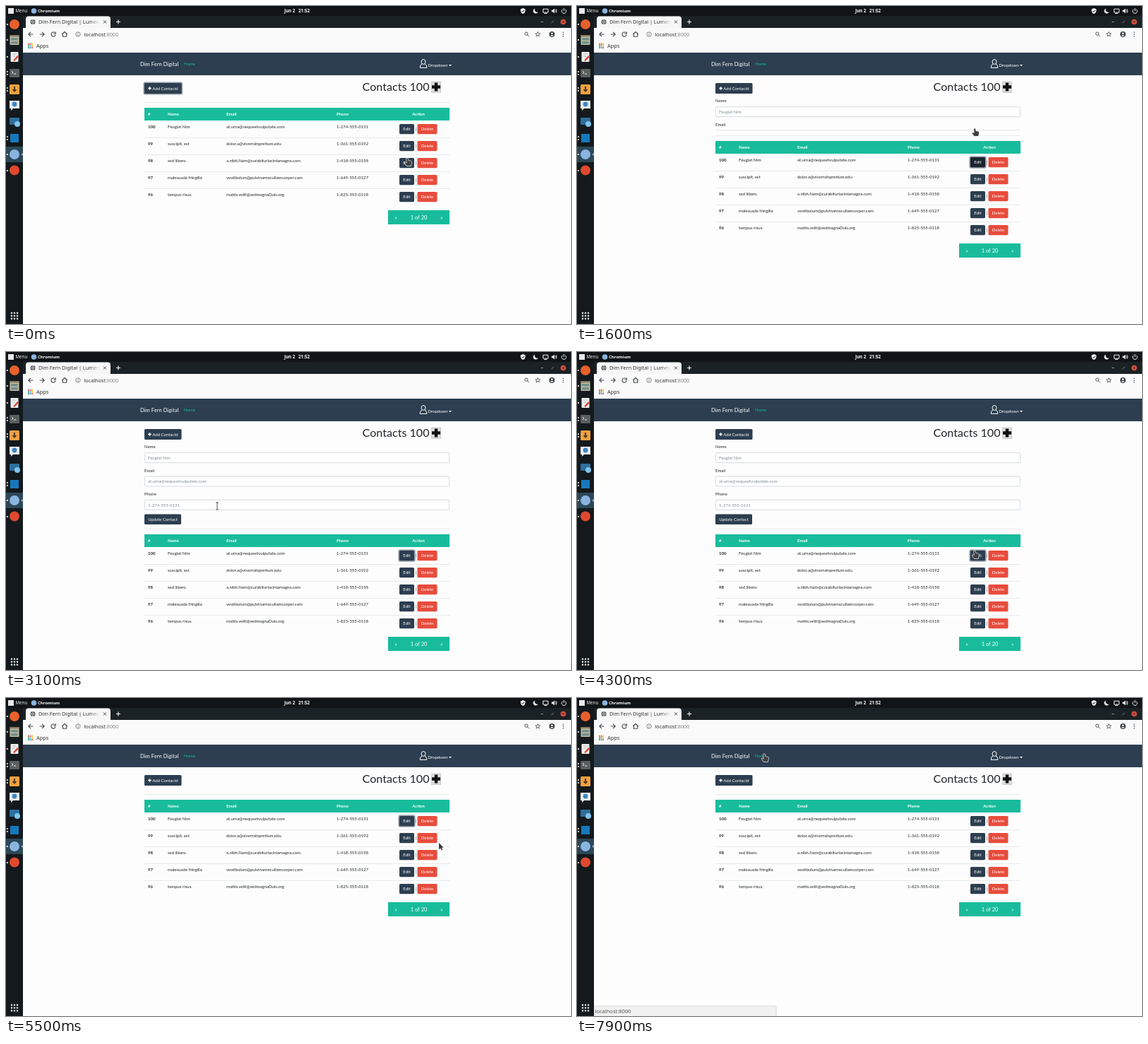
Write an HTML page with a canvas that moves like this. It is 800x450 px and loops after 8000 ms.

```html
<!DOCTYPE html>
<html lang="en">
<head>
<meta charset="utf-8">
<title>Contacts</title>
<style>
  html, body { margin: 0; width: 100%; height: 100%; overflow: hidden; background: #fdfdfd; }
  canvas { display: block; }
</style>
</head>
<body>
<canvas id="stage" width="800" height="450"></canvas>
<script>
const ctx = document.getElementById('stage').getContext('2d');
const LOOP = 8000, STEP = 100;
const NAVY = '#2c3e50', TEAL = '#18bc9c', RED = '#e74c3c', INK = '#212529', RULE = '#dfe3e6';
const LATO = 'Lato, sans-serif', NOTO = '"Noto Sans", sans-serif';
const BRAND = 'Dim Fern Digital';

const CONTACTS = [
  ['100', 'Feugiat Nim', 'at.urna@nequeetvulputate.com', '1-274-555-0131'],
  ['99', 'suscipit, est', 'dolor.a@viverraInpretium.edu', '1-361-555-0192'],
  ['98', 'sed libero.', 'a.nibh.Nam@curabiturlaciniamagna.com', '1-418-555-0158'],
  ['97', 'malesuada fringilla', 'vestibulum@pulvinarnecullamcorper.com', '1-649-555-0127'],
  ['96', 'tempus risus.', 'mattis.velit@sedmagnaDuis.org', '1-825-555-0118'],
];
const COLUMNS = [201, 229, 312, 468];

// time, x, y of the hot spot, pointer shape from then on
const POINTER = [
  [0, 568, 215, 'hand'], [200, 569, 238, 'hand'], [450, 589, 234, 'hand'],
  [700, 584, 196, 'hand'], [900, 566, 173, 'hand'], [1100, 566, 173, 'hand'],
  [1300, 563, 173, 'hand'], [1600, 563, 173, 'hand'], [1700, 540, 180, 'arrow'],
  [1800, 507, 188, 'beam'], [2300, 376, 191, 'beam'], [2600, 225, 212, 'beam'],
  [2800, 210, 240, 'hand'], [2900, 240, 228, 'arrow'], [3000, 285, 220, 'beam'],
  [3100, 299, 218, 'beam'], [3300, 299, 218, 'beam'], [3500, 400, 235, 'arrow'],
  [4000, 563, 281, 'hand'], [5000, 563, 281, 'hand'], [5100, 570, 270, 'arrow'],
  [5500, 613, 205, 'arrow'], [5700, 648, 160, 'arrow'], [5900, 607, 125, 'arrow'],
  [6100, 606, 119, 'hand'], [6600, 606, 119, 'hand'], [6700, 560, 117, 'arrow'],
  [7400, 300, 92, 'arrow'], [7600, 265, 79, 'hand'], [LOOP, 265, 79, 'hand'],
];

function box(x, y, w, h, fill, radius = 0, stroke) {
  ctx.beginPath();
  ctx.roundRect(x, y, w, h, radius);
  if (fill) { ctx.fillStyle = fill; ctx.fill(); }
  if (stroke) { ctx.strokeStyle = stroke; ctx.lineWidth = 0.8; ctx.stroke(); }
}

function disc(x, y, r, fill) {
  ctx.beginPath();
  ctx.arc(x, y, r, 0, Math.PI * 2);
  ctx.fillStyle = fill;
  ctx.fill();
}

function path(d, x, y, stroke, fill, width = 1) {
  const shape = new Path2D(d);
  ctx.save();
  ctx.translate(x, y);
  ctx.lineWidth = width;
  ctx.lineJoin = 'round';
  if (stroke) { ctx.strokeStyle = stroke; ctx.stroke(shape); }
  if (fill) { ctx.fillStyle = fill; ctx.fill(shape); }
  ctx.restore();
}

// y is the middle of the capitals
function text(s, x, y, size = 6, color = INK, { align = 'left', weight = 400, font = LATO } = {}) {
  ctx.font = `${weight} ${size}px ${font}`;
  ctx.textAlign = align;
  ctx.fillStyle = color;
  ctx.fillText(s, x, y + size * 0.36);
}

function button(label, x, y, w, h, fill, focused, textX = x + w / 2) {
  if (focused) box(x - 1.6, y - 1.6, w + 3.2, h + 3.2, 'rgba(44,62,80,.5)', 2.5);
  box(x, y, w, h, fill, 1.6);
  text(label, textX, y + h / 2, 6, '#fff', { align: 'center' });
}

function topBar() {
  const bold = { weight: 600, font: NOTO };
  box(0, 0, 800, 14, '#101416');
  box(3, 3, 8, 8, '#e8e8e8');
  text('Menu', 13.5, 7, 6.2, '#eee', { font: NOTO });
  disc(39.5, 7, 3.8, '#8ab4e0');
  text('Chromium', 45, 7, 5.9, '#fff', bold);
  text('Jun 2', 394, 7, 6.2, '#fff', bold);
  text('21:52', 430, 7, 6.2, '#fff', { ...bold, align: 'right' });
  path('M0-4L3.4-2.6V0Q3 3 0 4Q-3 3-3.4 0V-2.6Z', 732, 7, null, '#eee');
  path('M-1.5 0L-.3 1.3L1.8-1.2', 732, 7, '#101416');
  path('M-1-3.6A3.7 3.7 0 1 0 3.4 1.5A3.6 3.6 0 0 1-1-3.6Z', 750, 7, null, '#eee');
  path('M-3.5-2.8H3.5V2.2H-3.5ZM-2 3.6H2', 764, 7, '#eee');
  path('M-3.5-1.3H-2L.5-3.5V3.5L-2 1.3H-3.5Z', 776, 7, null, '#eee');
  path('M1.7-1.8Q3 0 1.7 1.8M2.8-3Q5 0 2.8 3', 776, 7, '#eee', null, 0.8);
  path('M-1.8-2.4A3.2 3.2 0 1 0 1.8-2.4M0-4V0', 790, 7, '#eee');
}

function launcher() {
  box(0, 14, 24, 436, '#13191c');
  box(0, 199, 24, 22, '#2c4757');
  disc(12, 26, 7, '#e8602c');
  box(5.5, 41, 13, 14, '#c9c0a6', 1);
  box(5.5, 41, 13, 2.5, '#8b7d63');
  box(7, 45, 10, 3.6, '#6f8f8a');
  box(7, 50, 10, 3.6, '#6f8f8a');
  box(6.5, 65, 11, 14, '#f1f1f1', 1);
  path('M-3-3H3M-3 0H1', 12, 71, '#aaa', null, 0.8);
  path('M-2 5L4-2L6 0L0 6Z', 12, 72, null, '#dd4b39');
  box(5, 89, 14, 12, '#59605f', 1);
  path('M-4-3L-2-1L-4 1M-1 1H2', 12, 95, '#fff', null, 0.9);
  box(5, 111, 14, 14, '#f0a040', 1.5);
  path('M-1-4H1V0H3.4L0 4L-3.4 0H-1Z', 12, 118, null, '#4b3a26');
  path('M-7-6H7V5H-2L-5 8V5H-7Z', 12, 140, null, '#e9edef');
  disc(12, 139, 3.4, '#3e86c4');
  box(5, 158, 14, 10, '#2e6f9e', 1);
  disc(16, 167, 4, '#7fc4ec');
  box(6, 181, 12, 12, '#1679bd');
  disc(12, 210, 7, '#8ab4e0');
  disc(12, 232.5, 7, '#e0492f');
  for (const y of [26, 48, 72, 210, 233]) disc(2, y, 1.1, '#fff');
  for (const y of [95, 118, 187]) { disc(2, y - 2, 1, '#fff'); disc(2, y + 2, 1, '#fff'); }
  path('M0-2L-2 0L0 2Z', 23.5, 210, null, '#ccc');
  for (let i = 0; i < 9; i++) disc(8 + i % 3 * 4, 434.5 + Math.floor(i / 3) * 4, 1.2, '#eee');
}

function browserFrame() {
  box(24, 14, 776, 17, '#1a2226');
  box(28, 14.5, 120, 18, '#f7f7f7', [4, 4, 0, 0]);
  disc(38, 22.5, 3.6, '#4f565a');
  path('M-3.6 0H3.6M0-3.6Q-3 0 0 3.6Q3 0 0-3.6', 38, 22.5, '#e8e8e8', null, 0.6);
  const fade = ctx.createLinearGradient(118, 0, 133, 0);
  fade.addColorStop(0, '#333');
  fade.addColorStop(1, 'rgba(51,51,51,0)');
  text(BRAND + ' | Lumen', 46, 22.5, 7.25, fade, { font: NOTO });
  path('M-2-2L2 2M2-2L-2 2', 140, 22.5, '#444');
  path('M-3 0H3M0-3V3', 159, 22.5, '#fff', null, 1.1);
  path('M-1.7 0H1.7', 759, 22.5, '#aaa', null, 0.9);
  path('M-1.6 1.6L1.6-1.6', 774, 22.5, '#999', null, 0.9);
  disc(789, 22.5, 3.8, '#d9523c');
  path('M-1.4-1.4L1.4 1.4M1.4-1.4L-1.4 1.4', 789, 22.5, '#2a1a18', null, 0.8);

  box(24, 31, 776, 35, '#fafafa');
  const dark = '#474b4f';
  path('M3.4 0H-3.2M0-3.2L-3.2 0L0 3.2', 35, 40, dark, null, 1.1);
  path('M-3.4 0H3.2M0-3.2L3.2 0L0 3.2', 51, 40, dark, null, 1.1);
  path('M2.2-2.2A3.1 3.1 0 1 0 3.1.6M3.3-3.7V-.8H.4', 67, 40, dark, null, 1.1);
  path('M-3.8 0L0-3.5L3.8 0M-2.6-.5V3.3H2.6V-.5', 83, 40, dark, null, 1.1);
  path('M3.2 0A3.2 3.2 0 1 1-3.2 0A3.2 3.2 0 1 1 3.2 0M0-.4V1.8M0-1.8V-1', 102, 40, '#666', null, 0.8);
  text('localhost', 110.5, 40, 7.2, '#333', { font: NOTO });
  const host = ctx.measureText('localhost').width;
  text(':8000', 110.5 + host, 40, 7.2, '#80868b', { font: NOTO });
  path('M1.4-.8A2.2 2.2 0 1 1-3-.8A2.2 2.2 0 1 1 1.4-.8M.8.8L3.3 3.3', 737.5, 40, dark, null, 0.9);
  path('M0-3.5L1-1.1L3.5-1L1.5.6L2.2 3L0 1.6L-2.2 3L-1.5.6L-3.5-1L-1-1.1Z', 753, 40, dark, null, 0.8);
  disc(773, 40, 3.9, '#3b4045');
  disc(773, 38.8, 1.3, '#fff');
  path('M-2.3 2Q0-.2 2.3 2Q0 3.4-2.3 2Z', 773, 40, null, '#fff');
  for (const d of [-2.7, 0, 2.7]) disc(789, 40 + d, 0.8, dark);
  const dots = ['#db4437', '#db4437', '#f4b400', '#0f9d58', '#4285f4', '#f4b400', '#0f9d58', '#4285f4', '#db4437'];
  dots.forEach((c, i) => box(31 + i % 3 * 2.6, 53 + Math.floor(i / 3) * 2.6, 1.8, 1.8, c));
  text('Apps', 43, 56.5, 7.4, '#333', { font: NOTO });
}

function pageHeader(addFocused) {
  box(24, 66, 776, 32, NAVY);
  text(BRAND, 190, 82, 7.6, '#fff');
  text('Home', 252, 82.3, 6, TEAL);
  path('M3 -3A3 3.4 0 1 1-3-3A3 3.4 0 1 1 3-3M-2 0Q-5 1-4.8 5.4H4.8Q5 1 2 0', 591, 82, '#fff', null, 1);
  text('Dropdown', 597.5, 84, 6, '#fff');
  path('M-2-1H2L0 1.2Z', 629, 84, null, '#fff');

  button('Add Contactd', 196, 109, 52.5, 15, NAVY, addFocused, 225.5);
  path('M-2.3 0H2.3M0-2.3V2.3', 203.5, 116.5, '#fff', null, 1.5);
  text('Contacts 100', 599.5, 114.5, 16.1, INK, { align: 'right' });
  box(602.5, 107, 13, 15.5, '#dcdcdc', 0, '#c4c4c4');
  path('M-6 0H6M0-6V6', 609, 114.5, '#111', null, 4.4);
}

function form(clipY) {
  ctx.save();
  ctx.beginPath();
  ctx.rect(190, 128, 444, clipY - 128);
  ctx.clip();
  ['Name', 'Email', 'Phone'].forEach((label, i) => {
    const y = 134.3 + i * 33.3;
    text(label, 196, y);
    box(196.4, y + 8.4, 431.2, 14, '#fff', 1.6, '#ccd2d8');
    text(CONTACTS[0][i + 1], 201, y + 15.6, 6, '#7f8c8d');
  });
  button('Update Contact', 196, 229.5, 52, 14.5, NAVY);
  ctx.restore();
}

function table(top, editFocused, editPressed) {
  box(196, top - 7.8, 432, 0.8, '#e6e6e6');
  box(196, top, 432, 18, TEAL);
  const head = { weight: 700 };
  ['#', 'Name', 'Email', 'Phone'].forEach((s, i) => text(s, COLUMNS[i], top + 9, 6, '#fff', head));
  text('Action', 584, top + 9, 6, '#fff', { weight: 700, align: 'center' });
  CONTACTS.forEach((contact, i) => {
    const y = top + 18 + i * 24;
    if (i) box(196, y, 432, 0.8, RULE);
    contact.forEach((s, c) => text(s, COLUMNS[c], y + 9.3, 6, INK, { weight: c ? 400 : 700 }));
    button('Edit', 557, y + 5, 21, 14.2, !i && editPressed ? '#1a252f' : NAVY, !i && editFocused);
    text('|', 580.3, y + 12, 6, INK, { align: 'center' });
    button('Delete', 582.5, y + 5, 28, 14.2, RED);
  });
  box(541, top + 145, 87, 20, TEAL);
  const mid = { align: 'center' };
  text('«', 552, top + 155, 7.5, '#fff', mid);
  text('1 of 20', 584.5, top + 155, 7.5, '#fff', mid);
  text('»', 616.5, top + 155, 7.5, '#fff', mid);
}

function pointer(t) {
  const i = POINTER.findLastIndex(k => k[0] <= t);
  const [t0, x0, y0, shape] = POINTER[i];
  const [t1, x1, y1] = POINTER[i + 1];
  const p = (t - t0) / (t1 - t0);
  const x = x0 + (x1 - x0) * p, y = y0 + (y1 - y0) * p;
  if (shape === 'beam') {
    path('M-2-5H2M-2 5H2M0-5V5', x, y, '#fff', null, 2);
    path('M-2-5H2M-2 5H2M0-5V5', x, y, '#444', null, 0.9);
  } else if (shape === 'arrow') {
    path('M0 0V9.2L2.2 7.4L3.7 10.4L5.2 9.7L3.8 6.8L6.4 6.4Z', x, y, '#f4f4f4', '#3b3b3b', 1.2);
  } else {
    path('M-1 1Q0-.6 1 1L1.8 4L5 4.6Q6.4 5 6 7L5.2 11H-.4L-3.4 7.4Q-3.6 6-2.2 6.3L-.4 7.2Z', x, y, '#f4f4f4', '#3f3f3f', 1.3);
  }
}

const slide = t => 0.5 - Math.cos(Math.PI * Math.min(1, Math.max(0, t / 400))) / 2;

function draw(t) {
  const opening = slide(t - 1425), closing = slide(t - 4424);
  const shown = opening - closing;
  const clipY = 128 + 120.5 * shown;
  const tableTop = shown === 0 ? 144 : shown === 1 ? 258 : clipY + 14.5;

  ctx.fillStyle = '#fdfdfd';
  ctx.fillRect(0, 0, 800, 450);
  pageHeader(t < 1425);
  if (shown > 0) form(clipY);
  table(tableTop, t >= 1425 && t < 6700, t >= 900 && t < 1700);
  browserFrame();
  if (t >= 7600) {
    box(22, 436, 260, 16, '#f1f1f1', 2, '#d0d0d0');
    text('localhost:8000', 25.5, 443, 7.5, '#555', { font: NOTO });
  }
  launcher();
  topBar();
  pointer(t);
}

function tick() {
  draw(Math.floor(performance.now() % LOOP / STEP) * STEP);
  requestAnimationFrame(tick);
}
tick();
</script>
</body>
</html>
```
